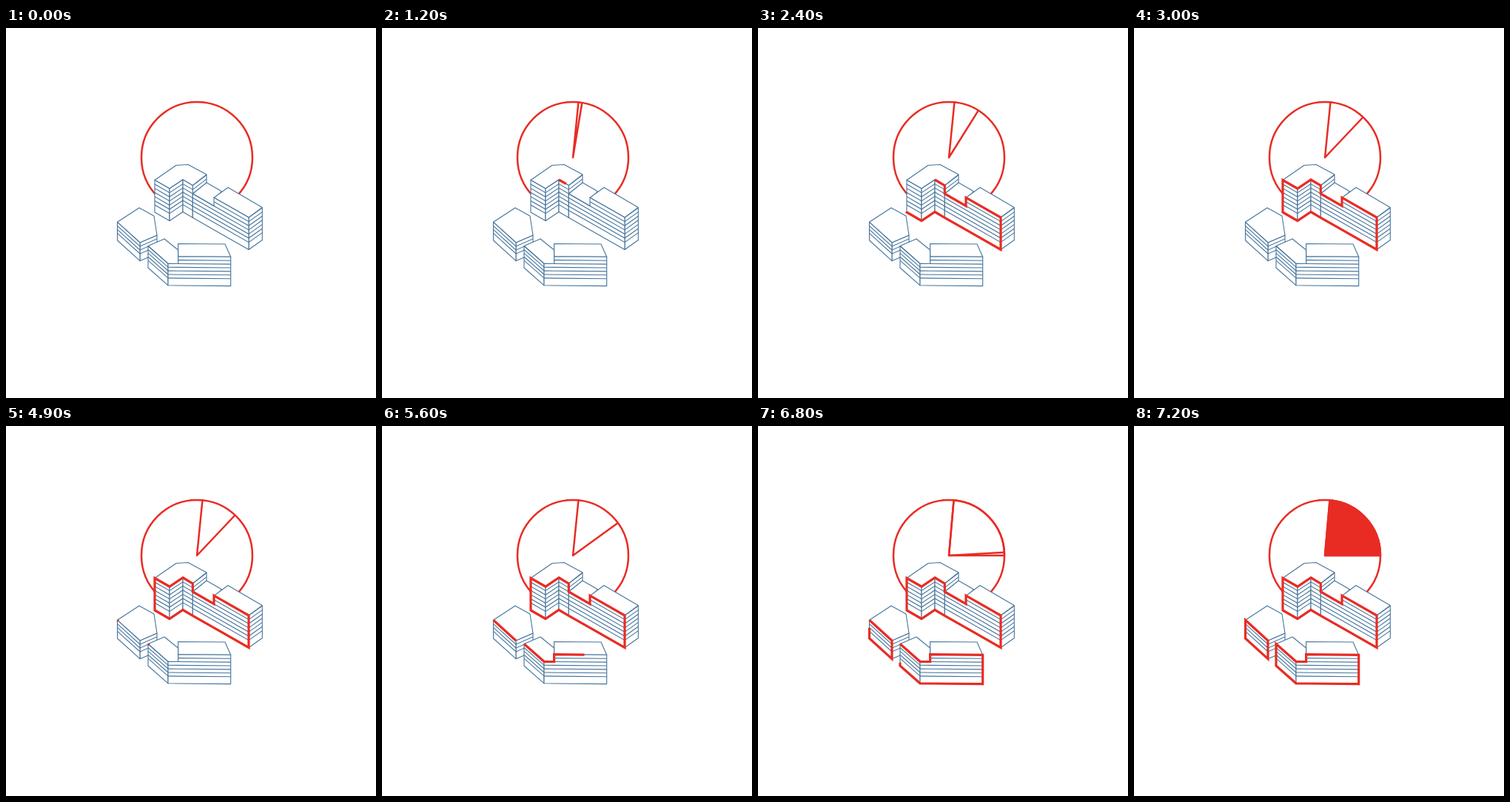
These frames come from a looping animation (500x500 px, 8 s). An HTML page with a canvas:

```html
<!DOCTYPE html>
<html lang="en">
<head>
<meta charset="utf-8">
<title>Buildings and pie</title>
<style>
html, body { margin: 0; width: 100%; height: 100%; overflow: hidden; background: #fff; }
canvas { display: block; width: 500px; height: 500px; }
</style>
</head>
<body>
<canvas id="stage" width="500" height="500"></canvas>
<script>
const ctx = document.getElementById('stage').getContext('2d');
const RED = '#e82c24', BLUE = '#45749b', LOOP = 8000, STEP = 100;
const CX = 258, CY = 175, R = 75;

const clamp = x => Math.max(0, Math.min(1, x));
const progress = (t, from, to) => clamp((t - from) / (to - from));
const smooth = x => x * x * (3 - 2 * x);

// A base point is [x, ground y, storeys missing from full height].
// Splits mark where one wall ends and the next begins; a roof joins the
// wall tops from index a to b with the points behind them.
const longBlock = {
  height: 43.5, storey: 5.6, start: 2, splits: [0, 1, 2, 4, 7],
  base: [[201, 249], [221, 260.5], [239, 248.5], [252.3, 256.3], [252.3, 256.3, 2],
    [281, 272.7, 2], [281, 272.7], [328, 299.5]],
  sides: [[[252.3, 256.3], [271, 242]], [[328, 299.5], [346.3, 286.5]]],
  roofs: [
    { a: 4, b: 5, back: [[291, 220.5], [271, 209]] },
    { a: 6, b: 7, back: [[346.3, 242.5], [300, 215.5]] },
    { a: 0, b: 3, back: [[271, 198], [246, 184.5], [230, 185.5]] },
  ],
};
const leftBlock = {
  height: 24.7, storey: 5, start: 0, splits: [0, 1],
  base: [[150.5, 287], [181, 314.7]],
  sides: [[[181, 314.7], [204, 304.7]]],
  roofs: [{ a: 0, b: 1, back: [[204, 280], [200, 254], [180, 243]] }],
};
const frontBlock = {
  height: 39.3, storey: 4.9, start: 0, splits: [0, 1, 4],
  base: [[192, 324, 2], [219, 347.8, 2], [232.6, 348, 2], [232.6, 348], [303.7, 348.6]],
  sides: [],
  roofs: [
    { a: 3, b: 4, back: [[296, 292], [232.6, 291.5]] },
    { a: 0, b: 2, back: [[232.6, 300], [214, 285]] },
  ],
};

function trace(points, close) {
  ctx.beginPath();
  points.forEach(([x, y]) => ctx.lineTo(x, y));
  if (close) ctx.closePath();
}

function face(points) {
  trace(points, true);
  ctx.fillStyle = '#fff';
  ctx.fill();
  ctx.stroke();
}

const topsOf = (base, { height, storey }) =>
  base.map(([x, y, missing = 0]) => [x, y - height + missing * storey]);

const shellOf = (base, block) => [...topsOf(base, block), ...[...base].reverse()];

function drawWall(base, block) {
  const { height, storey } = block;
  face(shellOf(base, block));
  ctx.save();
  ctx.clip();
  // The ground floor is taller than the storeys above it
  for (let drop = storey; drop < height - 1.5 * storey; drop += storey) {
    trace(base.map(([x, y]) => [x, y - height + drop]));
    ctx.stroke();
  }
  ctx.restore();
}

function drawBlock(block) {
  const { base, sides, roofs, splits } = block;
  const tops = topsOf(base, block);
  ctx.strokeStyle = BLUE;
  ctx.lineWidth = 1.1;
  ctx.lineJoin = 'round';
  sides.forEach(side => drawWall(side, block));
  roofs.forEach(({ a, b, back }) => face([...tops.slice(a, b + 1), ...back]));
  splits.slice(1).forEach((end, i) => drawWall(base.slice(splits[i], end + 1), block));
}

function drawOutline(block, amount) {
  const shell = shellOf(block.base, block);
  const loop = [...shell.slice(block.start), ...shell.slice(0, block.start)];
  const length = loop.reduce((sum, [x, y], i) => {
    const [nx, ny] = loop[(i + 1) % loop.length];
    return sum + Math.hypot(nx - x, ny - y);
  }, 0);
  ctx.strokeStyle = RED;
  ctx.lineWidth = 3.2;
  ctx.lineJoin = 'miter';
  trace(loop, true);
  ctx.setLineDash(amount < 1 ? [Math.max(2, amount * length), length * 2] : []);
  ctx.stroke();
  ctx.setLineDash([]);
}

const radians = degrees => degrees * Math.PI / 180;
const rim = degrees =>
  [CX + R * Math.sin(radians(degrees)), CY - R * Math.cos(radians(degrees))];

function drawPie(t) {
  ctx.strokeStyle = RED;
  ctx.lineWidth = 2.5;
  ctx.lineJoin = 'round';
  ctx.beginPath();
  ctx.arc(CX, CY, R, 0, Math.PI * 2);
  ctx.stroke();
  if (t < 1000) return;

  const closing = t >= 6700;
  const first = closing ? 5 : 5.7;
  const hand = 5.7 + 37.7 * progress(t, 1000, 3000) + 46.6 * progress(t, 4900, 6900) ** 1.4;
  trace([rim(first), [CX, CY], rim(hand)]);
  ctx.stroke();
  if (!closing) return;

  ctx.beginPath();
  ctx.moveTo(CX, CY);
  ctx.arc(CX, CY, R, radians(first - 90), 0);
  ctx.closePath();
  ctx.stroke();
  ctx.globalAlpha = progress(t, 6800, 7200);
  ctx.fillStyle = RED;
  ctx.fill();
  ctx.globalAlpha = 1;
}

function draw(t) {
  ctx.fillStyle = '#fff';
  ctx.fillRect(0, 0, 500, 500);
  drawPie(t);
  [longBlock, leftBlock, frontBlock].forEach(drawBlock);

  if (t >= 1000) drawOutline(longBlock, smooth(progress(t, 1000, 3000)));
  if (t >= 4900) {
    const amount = progress(t, 4900, 6950) ** 1.08;
    drawOutline(leftBlock, amount);
    drawOutline(frontBlock, amount);
  }
}

const began = performance.now();
function tick() {
  const t = (performance.now() - began) % LOOP;
  draw(Math.floor(t / STEP) * STEP);
  requestAnimationFrame(tick);
}
tick();
</script>
</body>
</html>
```
